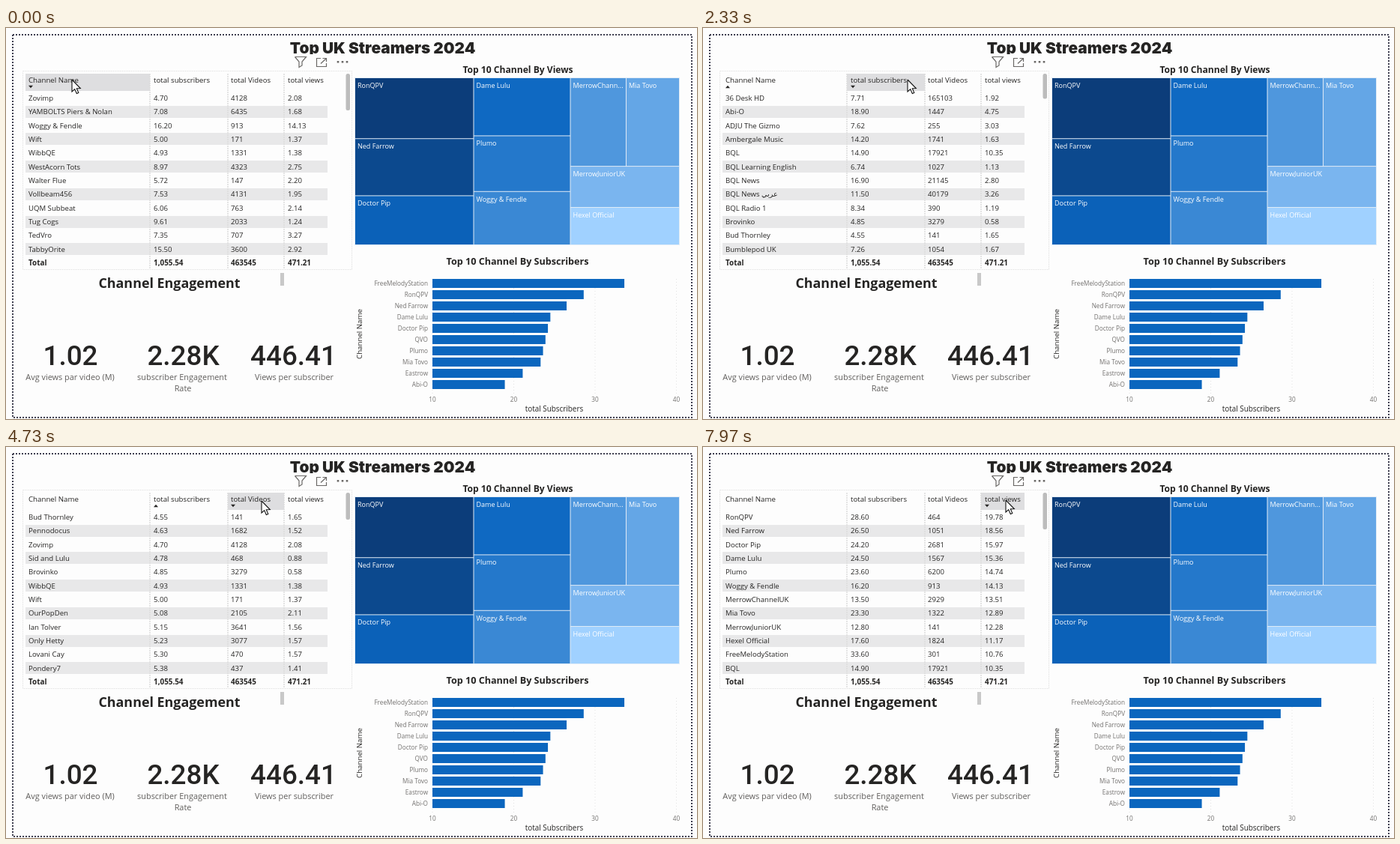
Recreate the animation shown at these times as an HTML page with a canvas. Size 922 by 522 pixels, loop 8000 ms.

```html
<!DOCTYPE html>
<html lang="en">
<head>
<meta charset="utf-8">
<title>Dashboard</title>
<style>
html, body { margin: 0; width: 100%; height: 100%; overflow: hidden; background: #fdfdfd; }
canvas { display: block; }
</style>
</head>
<body>
<canvas id="stage" width="922" height="522"></canvas>
<script>
const g = document.getElementById('stage').getContext('2d');
const LOOP = 8000;
const BG = '#fdfdfd', INK = '#252423', GREY = '#72706e', BLUE = '#0b66be';

// ---- data: names are ranked, values follow curves through a few points ----
const names = s => s.split('|');
const bySubs = names('FreeMelodyStation|RonQPV|Ned Farrow|Dame Lulu|Doctor Pip|QVO|Plumo|Mia Tovo|Eastrow|Abi-O|' +
  'Sirfixesgadget|Hexel Official|BQL News|Woggy & Fendle|TabbyOrite|BQL|Ambergale Music|MerrowChannelUK|' +
  'MerrowJuniorUK|Drupo|BQL News عربي|Harrowell FC|Our Y Chorus UK|Tug Cogs|WestAcorn Tots|BQL Radio 1|' +
  '36 Desk HD|ADJU The Gizmo|Vollbeam456|Fen News|TedVro|Bumblepod UK|Orm Town|YAMBOLTS Piers & Nolan|' +
  'BQL Learning English|FKV Daily|UQM Subbeat|Walter Flue|Pondery7|Lovani Cay|Only Hetty|Ian Tolver|' +
  'OurPopDen|Wift|WibbQE|Brovinko|Sid and Lulu|Zovimp|Pennodocus|Bud Thornley');
const byVideos = names('36 Desk HD|Fen News|BQL News عربي|BQL News|BQL|FKV Daily|Orm Town|' +
  'YAMBOLTS Piers & Nolan|Plumo|Harrowell FC|Drupo|Our Y Chorus UK');
const byViews = names('RonQPV|Ned Farrow|Doctor Pip|Dame Lulu|Plumo|Woggy & Fendle|MerrowChannelUK|' +
  'Mia Tovo|MerrowJuniorUK|Hexel Official|FreeMelodyStation|BQL');

const random = (i, k) => Math.abs(Math.sin(i * 12.9898 + k * 78.233) * 43758.5453) % 1;

function curve(points, x) {
  const i = points.findIndex(p => p[0] >= x);
  if (points[i][0] === x) return points[i][1];
  const [x0, y0] = points[i - 1], [x1, y1] = points[i];
  return y0 + (y1 - y0) * (x - x0) / (x1 - x0);
}
const subsCurve = [[0, 33.6], [1, 28.6], [2, 26.5], [3, 24.5], [7, 23.3], [9, 18.9], [20, 11.5],
  [26, 7.71], [33, 7.08], [38, 5.38], [49, 4.55]];
const videoCurve = [[0, 165103], [1, 46009], [2, 40179], [3, 21145], [5, 14696], [7, 6435], [11, 5494]];
const viewCurve = [[0, 19.78], [1, 18.56], [2, 15.97], [8, 12.28], [9, 11.17], [11, 10.35]];

const channels = bySubs.map((name, i) => {
  const subs = +curve(subsCurve, i).toPrecision(3);
  const v = byVideos.indexOf(name), w = byViews.indexOf(name);
  return [name, subs,
    Math.round(v < 0 ? 140 + 4800 * random(i, 1) ** 2 : curve(videoCurve, v)),
    w < 0 ? Math.min(10, subs * (0.1 + 0.35 * random(i, 2))) : curve(viewCurve, w)];
});

const sorted = (col, dir) => [...channels].sort((a, b) =>
  dir * (col ? a[col] - b[col] : a[0].localeCompare(b[0], 'en')));

// ---- timeline ----
const views = [[-412, 0, -1], [1320, 0, 1], [2600, 1, -1], [3900, 1, 1], [5200, 2, -1], [7560, 3, -1]]
  .map(([at, col, dir]) => ({ at, col, dir, rows: sorted(col, dir).slice(0, 12) }));

// pointer stops: arrival time, x, y
const MOVE = 450;
const stops = [[0, 88, 69], [1200, 273, 69], [3550, 341, 72], [6100, 359, 72], [7100, 404, 71]];

function pointerAt(t) {
  let [, x, y] = stops[0];
  for (const [at, x1, y1] of stops.slice(1)) {
    const u = Math.min(1, Math.max(0, (t - at) / MOVE + 1)), e = u * u * (3 - 2 * u);
    x += (x1 - x) * e;
    y += (y1 - y) * e;
  }
  return [x, y];
}

// ---- drawing helpers ----
function text(s, x, y, size, color = INK, align = 'left', weight = 400, font = 'Open Sans') {
  g.font = `${weight} ${size}px "${font}", "Noto Sans", "DejaVu Sans", sans-serif`;
  g.fillStyle = color;
  g.textAlign = align;
  g.fillText(s, x, y + size * 0.36); // y is the middle of the capitals
}

function box(x, y, w, h, color) {
  g.fillStyle = color;
  g.fillRect(x, y, w, h);
}

function line(color, width, dash, ...pts) {
  g.strokeStyle = color;
  g.lineWidth = width;
  g.setLineDash(dash);
  g.beginPath();
  pts.forEach(([x, y]) => g.lineTo(x, y));
  g.stroke();
  g.setLineDash([]);
}

function frameLine(color, width, dash, x, y, w, h) {
  line(color, width, dash, [x, y], [x + w, y], [x + w, y + h], [x, y + h], [x, y]);
}

function shape(pts, fill) {
  g.fillStyle = fill;
  g.beginPath();
  pts.forEach(([x, y]) => g.lineTo(x, y));
  g.closePath();
  g.fill();
}

// ---- parts ----
function page() {
  box(0, 0, 922, 522, BG);
  frameLine('#3f3f50', 2, [2, 2], 9, 9, 906, 511);
  text('Top UK Streamers 2024', 502.5, 27, 20.8, INK, 'center', 900, 'Inter');
}

function icons() {
  const c = '#6a6866';
  box(381, 35, 81, 21, BG);
  line(c, 1.2, [], [385.5, 38.5], [400.5, 38.5], [395, 45], [395, 50], [391, 52.5], [391, 45], [385.5, 38.5]);
  line(c, 1.2, [], [420, 40.5], [414.5, 40.5], [414.5, 51.5], [427.5, 51.5], [427.5, 47]);
  line(c, 1.2, [], [422.5, 40.5], [427.5, 40.5], [427.5, 45]);
  line(c, 1.2, [], [427.5, 40.5], [420, 47.5]);
  for (let i = 0; i < 3; i++) box(441.7 + i * 6, 44, 2.6, 2.5, c);
}

const edges = [26, 192, 296, 371, 429];
const textX = [30, 197, 300, 376];
const heads = ['Channel Name', 'total subscribers', 'total Videos', 'total views'];

function sortMark(col, dir) {
  const x = textX[col], y = 78.5;
  shape([[x, y + dir * 1.7], [x + 6, y + dir * 1.7], [x + 3, y - dir * 1.7]], INK);
}

function table(view, hover, age) {
  const rowY = i => 93.4 + i * 18.36;
  frameLine('#e6e6e6', 1, [2, 1], 22.5, 57.5, 439, 265);
  box(edges[hover], 61, edges[hover + 1] - edges[hover], 23, '#dedee0');
  for (let i = 1; i < 12; i += 2) box(26, Math.round(rowY(i) - 8), 403, 16, '#e8e8e9');
  for (const x of edges.slice(1, 4)) line('#dcdcdc', 1.5, [2, 1], [x, 61], [x, 321]);
  heads.forEach((h, i) => text(h, textX[i], 70, 9.7));
  sortMark(view.col, view.dir);
  if (hover !== view.col) sortMark(hover, -1);
  view.rows.forEach(([name, subs, videos, seen], i) =>
    [name, subs.toFixed(2), videos, seen.toFixed(2)].forEach((s, c) =>
      text(s, textX[c], rowY(i), 9.6)));
  ['Total', '1,055.54', '463545', '471.21'].forEach((s, c) =>
    text(s, textX[c], 313, 9.9, INK, 'left', 700));
  g.fillStyle = '#bcbcbc';
  g.beginPath();
  g.roundRect(453.5, 61, 5.5, 29 + 56 * Math.exp(-age / 400), 2.5); // shrinks as rows load
  g.fill();
}

function cards() {
  const label = (s, x, y) => text(s, x, y, 10.9, '#605e5c', 'center');
  const number = (s, x) => text(s, x, 436.5, 36.8, INK, 'center', 500, 'Roboto');
  box(366, 327, 5, 17, '#c8c8c8');
  text('Channel Engagement', 218, 341, 17.9, INK, 'center', 700);
  number('1.02', 86);
  number('2.28K', 236.5);
  number('446.41', 383.5);
  label('Avg views par video (M)', 85.5, 466);
  label('subscriber Engagement', 235, 466);
  label('Rate', 236, 481);
  label('Views per subscriber', 384.5, 466);
}

const viewsOf = rank => curve(viewCurve, rank);
const weight = node => Array.isArray(node) ? node.reduce((s, n) => s + weight(n), 0) : viewsOf(node);

// shade runs dark - middle - light from most to fewest views
function shade(rank) {
  const dark = [12, 61, 122], mid = [11, 102, 192], light = [160, 209, 255];
  const u = (viewsOf(rank) - viewsOf(9)) / (viewsOf(0) - viewsOf(9)) * 2 - 1;
  const end = u > 0 ? dark : light;
  return `rgb(${mid.map((m, i) => Math.round(m + (end[i] - m) * Math.abs(u)))})`;
}

function tile(rank, x, y, w, h) {
  let s = byViews[rank];
  box(x + 0.5, y + 0.5, w - 1, h - 1, shade(rank));
  g.font = '9px "Open Sans", "Noto Sans", sans-serif';
  if (g.measureText(s).width > w - 3) {
    while (g.measureText(s + '...').width > w - 3) s = s.slice(0, -1);
    s += '...';
  }
  text(s, x + 3.5, y + 10, 9, '#fff');
}

// splits a box among the parts of a node, turning at each level
function split(node, x, y, w, h, across = true) {
  if (!Array.isArray(node)) return tile(node, x, y, w, h);
  for (const part of node) {
    const f = weight(part) / weight(node);
    const pw = across ? w * f : w, ph = across ? h : h * f;
    split(part, x, y, pw, ph, !across);
    if (across) x += pw; else y += ph;
  }
}

function treemap() {
  text('Top 10 Channel By Views', 683, 56, 12.1, INK, 'center', 700);
  box(465, 66, 434, 224, '#e2ecf6');
  split([[0, 1, 2], [3, 4, 5], [[6, 7], 8, 9]], 465.5, 66.5, 433, 223);
}

function bars() {
  const barX = v => 569 + (v - 10) * 10.85;
  text('Top 10 Channel By Subscribers', 682.5, 311.5, 12.6, INK, 'center', 700);
  for (let v = 10; v <= 40; v += 10) {
    line('#e2e2e2', 1, [1, 3], [barX(v), 335], [barX(v), 488]);
    text(v, barX(v), 496, 8.2, GREY, 'center');
  }
  channels.slice(0, 10).forEach(([name, subs], i) => {
    const y = 341 + i * 15;
    box(569, y - 6, barX(subs) - 569, 12, BLUE);
    text(name, 563, y, 8.2, GREY, 'right');
  });
  text('total Subscribers', 731.5, 508.5, 9.9, INK, 'center');
  g.save();
  g.translate(472, 408.5);
  g.rotate(-Math.PI / 2);
  text('Channel Name', 0, 0, 9.7, INK, 'center');
  g.restore();
}

function pointer(x, y) {
  const pts = [[0, 0], [0, 16], [3.7, 12.6], [6.3, 18.5], [8.8, 17.4], [6.3, 11.7], [11.3, 11.5]]
    .map(([dx, dy]) => [x + dx, y + dy]);
  shape(pts, '#fff');
  line('#111', 1.1, [], ...pts, pts[0]);
}

function draw(t) {
  const view = views.findLast(v => v.at <= t);
  const [x, y] = pointerAt(t);
  page();
  table(view, edges.findLastIndex(e => e <= x), t - view.at);
  icons();
  cards();
  treemap();
  bars();
  pointer(x, y);
}

const start = performance.now();
function tick() {
  draw((performance.now() - start) % LOOP);
  requestAnimationFrame(tick);
}
tick();
</script>
</body>
</html>
```
